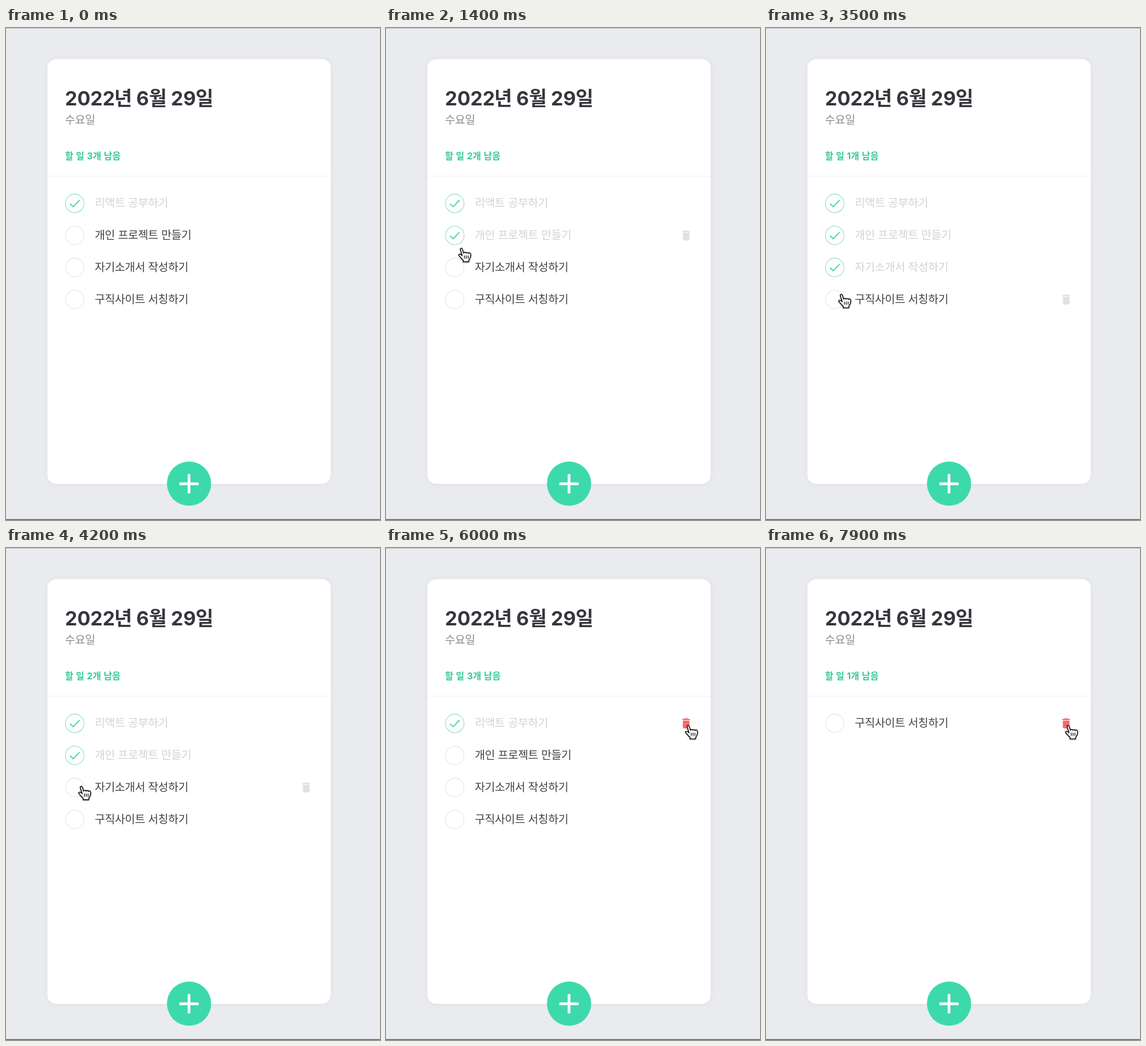
Animation of 653 by 858 pixels, one loop 8 s. Source, as an HTML page:

```html
<!DOCTYPE html>
<html lang="ko">
<head>
<meta charset="utf-8">
<title>할 일 목록</title>
<style>
  html, body { margin: 0; width: 100%; height: 100%; overflow: hidden; background: #eaebef; }
  svg { display: block; width: 653px; height: 858px; }
  text { font-family: Inter, "Noto Sans CJK KR", "Noto Sans CJK", sans-serif; }
  .card { fill: #fff; filter: drop-shadow(0 0 4px rgba(0, 0, 0, .05)); }
  .date { font-weight: 700; font-size: 34px; fill: #35363d; }
  .day { font-size: 19.5px; letter-spacing: -.4px; fill: #8a8c91; }
  .left { font-size: 16px; font-weight: 700; word-spacing: .6px; fill: #35c99c; }
  .label { font-size: 19.5px; letter-spacing: -.4px; word-spacing: .3px; fill: #404348; }
  .day, .label { font-family: "Noto Sans CJK KR", "Noto Sans CJK", sans-serif; }
  .ring { fill: none; stroke: #e1e4e7; stroke-width: 1.1; }
  .check { fill: none; stroke: #48d8ac; stroke-width: 2; visibility: hidden; }
  .bin { fill: #dee1e5; visibility: hidden; }
  .done .label { fill: #d0d3d6; }
  .done .ring { stroke: #8fe0c8; }
  .done .check, .hover .bin { visibility: visible; }
  .hot .bin { fill: #f7696b; }
  #hand { filter: drop-shadow(0 1px 1px rgba(0, 0, 0, .3)); }
</style>
</head>
<body>
<svg viewBox="0 0 653 858">
  <rect width="653" height="858" fill="#eaebef"/>
  <rect width="653" height="1" fill="#b8babe"/>
  <rect y="856.5" width="653" height="1.5" fill="#3a7b3c"/>
  <rect class="card" x="72.3" y="54.3" width="494.6" height="740.6" rx="15.5"/>
  <text class="date" y="134.6"><tspan x="103">2022</tspan><tspan x="189">년</tspan><tspan x="227.5">6</tspan><tspan x="249.5">월</tspan><tspan x="288">29</tspan><tspan x="331">일</tspan></text>
  <text class="day" x="103" y="167">수요일</text>
  <text class="left" id="left" x="103" y="228.5"></text>
  <rect x="72.3" y="257.8" width="494.6" height="1" fill="#eeeff2"/>
  <g id="list"></g>
  <circle cx="319.6" cy="794.6" r="38.6" fill="#3cdaab"/>
  <path d="M302.8 794.8h33.6M319.6 778v33.6" stroke="#fff" stroke-width="4.8"/>
  <g id="hand">
    <path fill="#fff" stroke="#111" stroke-width="1.6" stroke-linejoin="round"
      d="M9.6 10 7.3 3C6.4.5 3.1 1.4 3.9 4.1L7.1 14.4C5.6 12.7 3.6 11.3 2 11.8.6 12.3.8 13.6 1.8 14.6
         4.2 17 5.4 20 8.8 22V25H18.6V22.4C20.4 19.6 22.3 17.4 22 13 21.8 10.2 20.6 9.2 19.3 9.4
         18.4 9.5 17.9 10 17.9 10.6 17.4 8.4 14.2 8.2 13.8 10 13.2 7.9 9.8 8 9.6 10Z"/>
    <path fill="none" stroke="#111" stroke-width="1.3" d="M11 14.2v5.4M14.2 14.2v5.4M17.4 14.2v5.4"/>
  </g>
</svg>
<script>
const LOOP = 8000, STEP = 100, PITCH = 55.9, FIRST = 305.8;
const $ = id => document.getElementById(id);

// on / off: when a task is ticked and unticked; gone: when it is deleted
const tasks = [
  { name: '리액트 공부하기', on: 0, gone: 6200 },
  { name: '개인 프로젝트 만들기', on: 1200, off: 4600, gone: 6700 },
  { name: '자기소개서 작성하기', on: 1800, off: 3900, gone: 7200 },
  { name: '구직사이트 서칭하기' }
];

// pointer strokes, each eased from where the last one ended
const strokes = [
  { from: 300, to: 400, x: 128, y: 458 },
  { from: 600, to: 1100, x: 126, y: 364 },
  { from: 1200, to: 1700, x: 126, y: 417 },
  { from: 1900, to: 2400, x: 126, y: 463 },
  { from: 3500, to: 3900, x: 126, y: 417 },
  { from: 4100, to: 4700, x: 125, y: 378 },
  { from: 4800, to: 6000, x: 522, y: 308, lift: 70 }
];

$('list').innerHTML = tasks.map(k => `<g>
  <circle class="ring" cx="120" r="16.2"/>
  <path class="check" d="M111.8 .6 117.2 5.8 128.4 -5.6"/>
  <text class="label" x="155" y="6.4">${k.name}</text>
  <path class="bin" transform="translate(512.5 -11.6) scale(.967)"
    d="M6 19c0 1.1.9 2 2 2h8c1.1 0 2-.9 2-2V7H6zM19 4h-3.5l-1-1h-5l-1 1H5v2h14z"/>
</g>`).join('');
const rows = [...$('list').children];

const ease = u => u * u * (3 - 2 * u);

function pointer(t) {
  if (t < strokes[0].from) return null;
  let x = 129, y = 495;
  for (const s of strokes) {
    if (t <= s.from) break;
    const u = ease(Math.min(1, (t - s.from) / (s.to - s.from)));
    x += (s.x - x) * u;
    y += (s.y - y) * u - (s.lift || 0) * Math.sin(Math.PI * u);
  }
  return [x, y];
}

function draw(t) {
  const pos = pointer(t);
  const over = pos ? Math.max(0, Math.round((pos[1] + 1 - FIRST) / PITCH)) : -1;
  let slot = 0, open = 0;
  tasks.forEach(({ on = LOOP, off = LOOP, gone = LOOP }, i) => {
    const g = rows[i], live = t < gone, done = t >= on && t < off;
    g.style.display = live ? '' : 'none';
    if (!live) return;
    g.setAttribute('transform', `translate(0 ${FIRST + slot * PITCH})`);
    g.classList.toggle('done', done);
    g.classList.toggle('hover', slot === over);
    g.classList.toggle('hot', slot === over && pos[0] > 505);
    slot++;
    if (!done) open++;
  });
  $('left').textContent = `할 일 ${open}개 남음`;
  $('hand').style.display = pos ? '' : 'none';
  if (pos) $('hand').setAttribute('transform', `translate(${pos})`);
}

// the screen refreshes ten times a second
let start, last = -1;
function tick(now) {
  start ??= now;
  const t = Math.floor((now - start) % LOOP / STEP) * STEP;
  if (t !== last) draw(last = t);
  requestAnimationFrame(tick);
}
draw(0);
requestAnimationFrame(tick);
</script>
</body>
</html>
```
